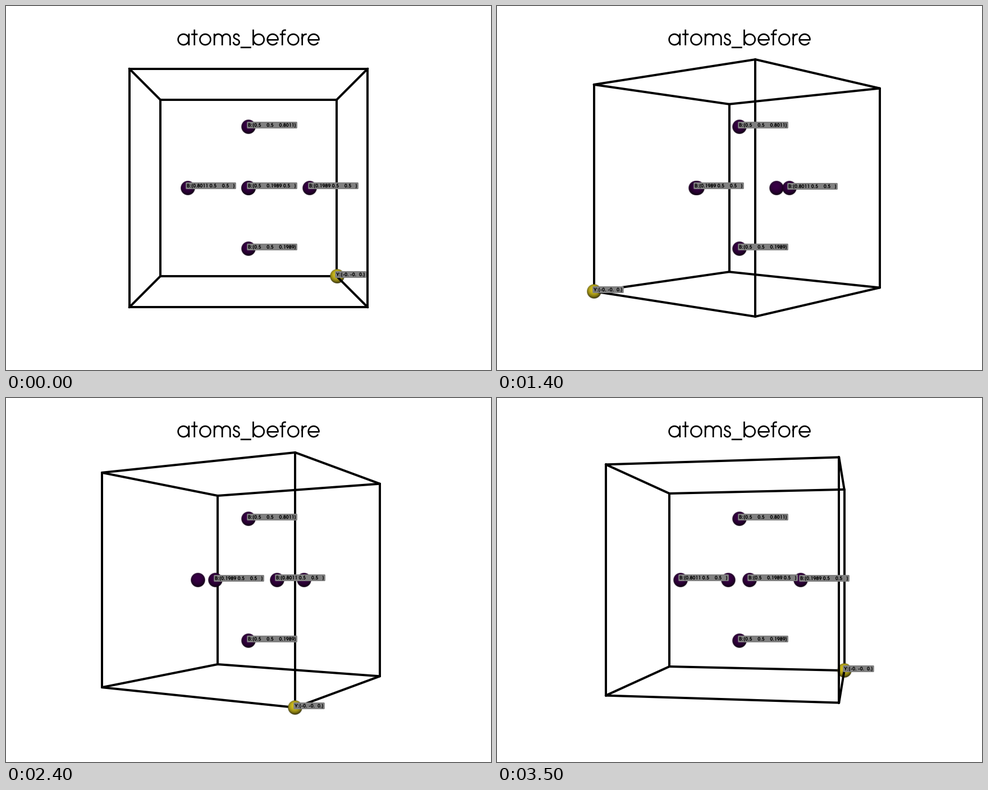
Animation, 864 px wide and 648 px high, one loop 3600 ms. Source, as a matplotlib script:

```python
from itertools import product

import matplotlib.pyplot as plt
import numpy as np
from matplotlib.animation import FuncAnimation
from matplotlib.patches import FancyBboxPatch, PathPatch
from matplotlib.path import Path
from matplotlib.transforms import Affine2D

W, H, DPI = 864, 648, 100
FRAMES, STEP = 36, 100
FOCAL = H / 2 / np.tan(np.radians(15))
DIST = np.sqrt(3) / 2 / np.sin(np.radians(15))
RADIUS = 12.6        # ball radius in pixels
MIN_GAP = 84         # labels closer than this collide
PT = 72 / DPI


# ---- geometric stroke font, 1000 units per em ----
def arc(cx, cy, rx, ry, a0=0, a1=360):
    a = np.radians(np.linspace(a0, a1, 40))
    return list(zip(cx + rx * np.cos(a), cy + ry * np.sin(a)))


def curve(p0, p1, p2, p3):
    t = np.linspace(0, 1, 16)[:, None]
    p0, p1, p2, p3 = map(np.array, (p0, p1, p2, p3))
    pts = ((1 - t) ** 3 * p0 + 3 * t * (1 - t) ** 2 * p1
           + 3 * t ** 2 * (1 - t) * p2 + t ** 3 * p3)
    return [tuple(p) for p in pts]


def dot(y):
    return [(75, y), (205, y)]


GLYPHS = {
    "a": (683, [arc(328, 273, 250, 250), [(584, 0), (584, 547)]]),
    "t": (339, [[(160, 0), (160, 740)], [(13, 513), (310, 513)]]),
    "o": (655, [arc(328, 273, 250, 250)]),
    "m": (938, [[(99, 0), (99, 547)],
                arc(284, 340, 185, 185, 180, 0) + [(469, 0)],
                arc(654, 340, 185, 185, 180, 0) + [(839, 0)]]),
    "s": (388, [curve((318, 405), (312, 560), (75, 570), (75, 410))
                + curve((75, 410), (75, 270), (330, 310), (330, 150))
                + curve((330, 150), (330, -25), (58, -20), (52, 160))]),
    "_": (500, [[(0, -100), (500, -100)]]),
    "b": (682, [arc(354, 273, 250, 250), [(97, 0), (97, 740)]]),
    "e": (650, [[(80, 255)] + arc(327, 273, 248, 250, -4, 328)]),
    "f": (314, [[(128, 0), (128, 590)]
                + curve((128, 590), (128, 690), (190, 725), (300, 708)),
                [(11, 513), (285, 513)]]),
    "r": (301, [[(92, 0), (92, 547)],
                curve((92, 300), (95, 460), (170, 525), (305, 520))]),
    "B": (580, [[(110, 60), (110, 680), (290, 680)]
                + arc(290, 535, 145, 145, 90, -90) + [(110, 390)],
                [(290, 390)] + arc(320, 225, 165, 165, 90, -90) + [(110, 60)]]),
    "Y": (620, [[(50, 720), (310, 330), (570, 720)], [(310, 330), (310, 0)]]),
    "0": (560, [arc(280, 365, 190, 315)]),
    "1": (560, [[(160, 675), (320, 675), (320, 0)]]),
    "5": (560, [[(450, 680), (205, 680), (150, 390)]
                + arc(270, 240, 190, 185, 130, -155)]),
    "8": (560, [arc(280, 530, 145, 150), arc(280, 215, 190, 165)]),
    "9": (560, [arc(280, 480, 195, 200), [(455, 390), (250, 0)]]),
    ".": (280, [dot(65)]),
    ":": (280, [dot(65), dot(480)]),
    "-": (420, [[(70, 270), (350, 270)]]),
    "(": (380, [arc(400, 290, 220, 500, 120, 240)]),
    ")": (380, [arc(-20, 290, 220, 500, 60, -60)]),
    " ": (280, []),
}


def text_path(text, size):
    """Outline-free path of a line of text and its width in pixels."""
    verts, codes, x = [], [], 0
    for ch in text:
        adv, strokes = GLYPHS[ch]
        for s in strokes:
            verts += [((x + u) * size / 1000, -v * size / 1000) for u, v in s]
            codes += [Path.MOVETO] + [Path.LINETO] * (len(s) - 1)
        x += adv
    return Path(verts, codes), x * size / 1000


def stroke(path, width, **kw):
    return ax.add_patch(PathPatch(path, fill=False, ec="black", lw=width * PT,
                                  capstyle="butt", joinstyle="round",
                                  snap=False, **kw))


def ball(rgb):
    """Shaded sphere sprite."""
    n = 104
    v, u = np.mgrid[-1:1:n * 1j, -1:1:n * 1j]
    r2 = u ** 2 + v ** 2
    w = np.sqrt(np.clip(1 - r2, 0, 1))
    light = np.clip(-0.08 * u - 0.28 * v + 0.95 * w, 0, 1)
    shade = 0.16 + 0.68 * light
    img = np.empty((n, n, 4))
    img[..., :3] = np.array(rgb) / 255 * shade[..., None]
    img[..., 3] = np.clip((1 - np.sqrt(r2)) * RADIUS + 0.3, 0, 1)
    return img


def project(p, ang):
    """Screen x, y, depth and scale of a point in the unit cell."""
    u, v = 0.5 - p[0], 0.5 - p[1]
    c, s = np.cos(ang), np.sin(ang)
    depth = u * s + v * c
    k = FOCAL / (DIST + depth)
    return W / 2 + k * (u * c - v * s), H / 2 - k * (p[2] - 0.5), depth, k


fig = plt.figure(figsize=(W / DPI, H / DPI), dpi=DPI, facecolor="white")
ax = fig.add_axes([0, 0, 1, 1])
ax.axis("off")

title, title_w = text_path("atoms_before", 38)
stroke(title, 2.7,
       transform=Affine2D().translate(W / 2 - title_w / 2, 70) + ax.transData)


class Atom:
    def __init__(self, order, pos, text, rgb):
        self.pos = pos
        self.img = ax.imshow(ball(rgb), interpolation="bilinear", aspect="auto")
        path, width = text_path(text, 8.8)
        self.shift = Affine2D()
        tr = self.shift + ax.transData
        z = 10 + 2 * order
        box = FancyBboxPatch((-1, -8), width + 2, 10, fc="#808080", ec="none",
                             boxstyle="round,pad=1,rounding_size=1.6",
                             zorder=z, transform=tr)
        self.label = (ax.add_patch(box),
                      stroke(path, 1.2, zorder=z + 1, transform=tr))

    def place(self, ang, taken):
        x, y, d, _ = project(self.pos, ang)
        self.img.set_extent((x - RADIUS, x + RADIUS, y + RADIUS, y - RADIUS))
        self.img.set_zorder(-d)
        lx, ly = round(x), int(y + 1e-6)
        if self.pos[2] == 0.5 and d > -1e-6:
            ly -= 1
        free = all(abs(lx - a) >= MIN_GAP or abs(ly - b) > 13 for a, b in taken)
        if free:
            taken.append((lx, ly))
        self.shift.clear().translate(lx - 0.8, ly)
        for part in self.label:
            part.set_visible(free)


LO, HI = 0.1989, 0.8011
PURPLE, YELLOW = (68, 1, 84), (253, 231, 36)
atoms = [Atom(0, (0, 0, 0), "Y:(-0. -0.  0.)", YELLOW)]
for axis, val in product(range(3), (LO, HI)):
    pos = [0.5] * 3
    pos[axis] = val
    text = "B:(" + " ".join(f"{v:<6}" for v in pos) + ")"
    atoms.append(Atom(len(atoms), pos, text, PURPLE))

edges = []
for axis, a, b in product(range(3), (0, 1), (0, 1)):
    p, q = [a, b], [a, b]
    p.insert(axis, 0)
    q.insert(axis, 1)
    line, = ax.plot([], [], color="black", lw=4 * PT, solid_capstyle="round")
    edges.append((line, axis, p, q))

ax.set_xlim(0, W)
ax.set_ylim(H, 0)


def update(i):
    ang = 2 * np.pi * i / FRAMES
    taken = []
    for atom in atoms:
        atom.place(ang, taken)
    for line, axis, p, q in edges:
        x0, y0, d0, k = project(p, ang)
        x1, y1, d1, _ = project(q, ang)
        z = -(d0 + d1) / 2
        if not any(p):
            # edges of the yellow corner come out of its surface
            start = list(p)
            start[axis] = RADIUS / k
            x0, y0, _, _ = project(start, ang)
            z = -d0 + (0.01 if d1 < d0 - 1e-6 else -0.01)
        line.set_data([x0, x1], [y0, y1])
        line.set_zorder(z)
    return []


anim = FuncAnimation(fig, update, frames=FRAMES, interval=STEP,
                     init_func=lambda: update(0), repeat=True, repeat_delay=0)
plt.show()
```
